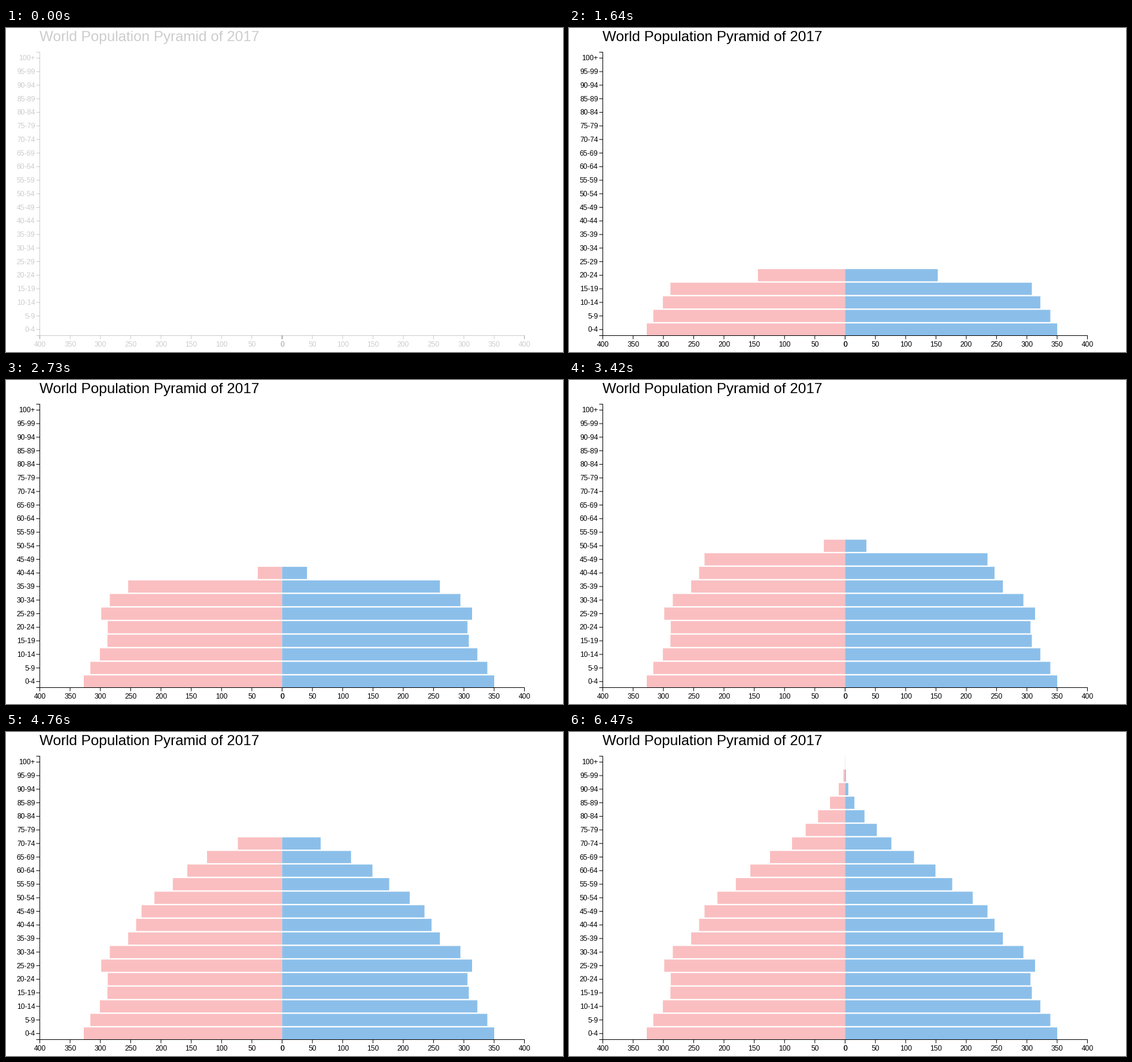
These frames come from a looping animation (931x543 px, 7250 ms). A matplotlib script:

```python
import math

import matplotlib.pyplot as plt
from matplotlib.animation import FuncAnimation
from matplotlib.collections import LineCollection, PolyCollection

W, H, DPI = 931, 543, 64
LOOP, FRAMES = 7250, 290
INTERVAL = LOOP / FRAMES
STEP = LOOP / 93            # the picture is held for this many ms
LAST_STEP = 83
PX = 72 / DPI               # points per pixel

LEFT, MID, RIGHT = 56.5, 461.5, 866.5
TOP, BASE = 40.5, 515.5
BAR_TOP, PITCH, BAND = 40.1, 22.75, 20.47
PINK, BLUE = "#fabec0", "#8bbfea"

# Bar lengths in pixels, youngest group first
FEMALE = [331.5, 320.5, 304.6, 292, 291.4, 302.3, 288, 257.3, 244, 235, 213.4,
          182.6, 158.4, 125.5, 88.7, 65.9, 45.2, 25.3, 10.7, 2.8, 0.4]
MALE = [354.5, 343, 326.3, 312.1, 309.8, 317.5, 298, 263.7, 249.8, 238, 213.3,
        179, 151, 115.2, 77.3, 53, 32.4, 15.5, 5.4, 1.5, 0.1]
AGES = [f"{a}-{a + 4}" for a in range(0, 100, 5)] + ["100+"]

fig = plt.figure(figsize=(W / DPI, H / DPI), dpi=DPI, facecolor="white")
ax = fig.add_axes([0, 0, 1, 1])
ax.set_xlim(0, W)
ax.set_ylim(H, 0)
ax.axis("off")

fading = []


def label(x, y, text, size=12, ha="center"):
    fading.append(ax.text(x, y, text, ha=ha, va="baseline", color="black",
                          fontsize=size * PX, family="Liberation Sans"))


def lines(paths):
    col = LineCollection(paths, colors="black", linewidths=PX, zorder=3)
    col.set_snap(False)
    fading.append(ax.add_collection(col, autolim=False))


def bar_set(color):
    col = PolyCollection([], facecolors=color, linewidths=0, zorder=2)
    col.set_snap(False)
    return ax.add_collection(col, autolim=False)


def row_top(i):
    return BAR_TOP + PITCH * (20 - i)


def value_axis(start, end, values):
    """Half of the bottom axis; both halves share the zero tick."""
    gap = (end - start) / (len(values) - 1)
    lines([[(start, BASE + 6), (start, BASE), (end, BASE), (end, BASE + 6)]])
    ticks = []
    for k, value in enumerate(values):
        x = start + k * gap
        ticks.append([(x, BASE), (x, BASE + 6)])
        label(x, 534, str(value))
    lines(ticks)


def age_axis():
    lines([[(LEFT - 6, TOP), (LEFT, TOP), (LEFT, BASE), (LEFT - 6, BASE)]])
    ticks = []
    for i, age in enumerate(AGES):
        y = row_top(i) + BAND / 2
        ticks.append([(LEFT - 6, y), (LEFT, y)])
        label(48.6, y + 4, age, ha="right")
    lines(ticks)


label(56.5, 22, "World Population Pyramid of 2017", size=24.2, ha="left")
age_axis()
value_axis(LEFT, MID, range(400, -1, -50))
value_axis(MID, RIGHT, range(0, 401, 50))
female, male = bar_set(PINK), bar_set(BLUE)


def bar(i, length):
    y = row_top(i)
    x = MID + length
    return [(MID, y), (x, y), (x, y + BAND), (MID, y + BAND)]


def draw(frame):
    step = min(LAST_STEP, int((frame * INTERVAL + 30) / STEP))
    if frame == 0:
        step = 0
    alpha = min(1, 0.2 + 0.22 * step)
    for artist in fading:
        artist.set_alpha(alpha)

    # Bars grow one after another, each in six equal ticks
    grown = math.floor(1.565 * step - 5.75) / 6
    parts = [min(1, max(0, grown - i)) for i in range(len(AGES))]
    shown = [(i, p) for i, p in enumerate(parts) if p > 0]
    female.set_verts([bar(i, -FEMALE[i] * p) for i, p in shown])
    male.set_verts([bar(i, MALE[i] * p) for i, p in shown])
    return [female, male, *fading]


anim = FuncAnimation(fig, draw, frames=FRAMES, interval=INTERVAL,
                     repeat=True, repeat_delay=0, blit=False)
plt.show()
```
